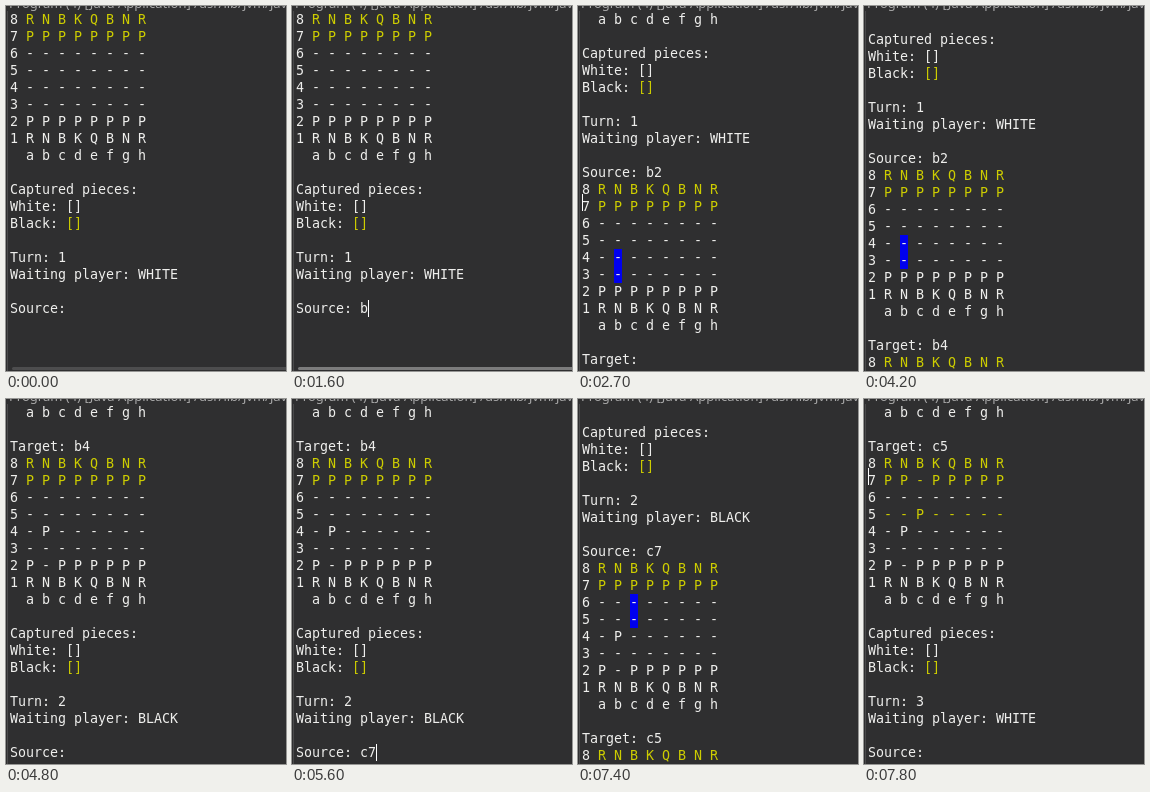
Write an HTML page with a canvas that moves like this. It is 280 px wide and 365 px high and loops after 8000 ms.

```html
<!DOCTYPE html>
<html lang="en">
<head>
<meta charset="utf-8">
<title>Console chess</title>
<style>
  html, body { margin: 0; width: 100%; height: 100%; overflow: hidden; background: #2f2f30; }
  canvas { display: block; }
</style>
</head>
<body>
<canvas id="stage" width="280" height="365"></canvas>
<script>
const ctx = document.getElementById('stage').getContext('2d');
const W = 280, H = 365, LOOP = 8000;
const LEFT = 4, CELL = 8, LINE = 17, ASCENT = 13;
const BG = '#2f2f30', TEXT = '#eeeeec', YELLOW = '#cdcd00', BLUE = '#0000ee';

// Console content: each line is { text, yellowFrom, yellowTo, mark }
const lines = [];
const say = (text = '', from = 0, to = 0) => lines.push({ text, from, to, mark: -1 });

function board(ranks, marks = []) {
  ranks.forEach((rank, i) => {
    say(8 - i + ' ' + [...rank].join(' '));
    const line = lines[lines.length - 1];
    if (i < 4 && /[A-Z]/.test(rank) && !(rank.startsWith('-P'))) {
      line.from = 2;
      line.to = 17;
    }
    const mark = marks.find(m => m[1] === 8 - i);
    if (mark) line.mark = 2 + 2 * 'abcdefgh'.indexOf(mark[0]);
  });
  say('  a b c d e f g h');
  say();
}

function status(turn, player) {
  say('Captured pieces:');
  say('White: []');
  say('Black: []', 7, 9);
  say();
  say('Turn: ' + turn);
  say('Waiting player: ' + player);
  say();
}

const BACK = 'RNBKQBNR', PAWNS = 'PPPPPPPP', NONE = '--------';
const start = [BACK, PAWNS, NONE, NONE, NONE, NONE, PAWNS, BACK];
const second = [BACK, PAWNS, NONE, NONE, '-P------', NONE, 'P-PPPPPP', BACK];
const third = [BACK, 'PP-PPPPP', NONE, '--P-----', '-P------', NONE, 'P-PPPPPP', BACK];

board(start);
status(1, 'WHITE');
say('Source: b2');
board(start, [['b', 4], ['b', 3]]);
say('Target: b4');
board(second);
status(2, 'BLACK');
say('Source: c7');
board(second, [['c', 6], ['c', 5]]);
say('Target: c5');
board(third);
status(3, 'WHITE');
say('Source: ');

// [time, last line, y of last line, typed chars on last line, caret, stray caret y]
const ALL = 99, PROMPT = 8;
const states = [
  [0, 17, 294, PROMPT, false, 0],
  [1000, 17, 294, PROMPT, true, 0],
  [1600, 17, 294, 9, true, 0],
  [1900, 17, 294, 10, true, 0],
  [2600, 18, 311, ALL, false, 0],
  [2700, 28, 345, PROMPT, false, 188],
  [3300, 28, 345, PROMPT, false, 0],
  [3400, 28, 345, 9, true, 0],
  [4000, 28, 345, 10, true, 0],
  [4200, 29, 348, ALL, false, 0],
  [4300, 46, 345, PROMPT, false, 69],
  [4800, 46, 345, PROMPT, false, 0],
  [5100, 46, 345, 9, true, 0],
  [5600, 46, 345, 10, true, 0],
  [5800, 47, 348, ALL, false, 0],
  [5900, 57, 345, PROMPT, false, 188],
  [6500, 57, 345, PROMPT, false, 0],
  [6700, 57, 345, 9, true, 0],
  [7100, 57, 345, 10, true, 0],
  [7400, 58, 348, ALL, false, 0],
  [7500, 74, 348, ALL, false, 0],
  [7800, 75, 345, PROMPT, false, 69]
];

function box(color, x, y, w, h) {
  ctx.fillStyle = color;
  ctx.fillRect(x, y, w, h);
}

function drawLine(line, y, count) {
  [...line.text].slice(0, count).forEach((ch, i) => {
    const x = LEFT + i * CELL;
    if (i === line.mark) box(BLUE, x, y, CELL, LINE);
    if (ch === ' ') return;
    ctx.fillStyle = i >= line.from && i < line.to ? YELLOW : TEXT;
    ctx.fillText(ch, x, y + ASCENT);
  });
}

function drawHeader() {
  ctx.save();
  ctx.beginPath();
  ctx.rect(0, 0, W, 5);
  ctx.clip();
  ctx.font = '13px "Noto Sans", sans-serif';
  ctx.fillStyle = '#a9a9a9';
  ctx.fillText('Program (4) [Java Application] /usr/lib/jvm/java', 3, 2);
  ctx.restore();
}

// The scroll bar fades in and out in 100 ms steps
function barLevel(t) {
  const step = Math.floor(t / 100);
  if (t < 1900) return Math.min(1, 0.4 + 0.12 * step);
  if (t < 2400) return Math.max(0.2, 1 - 0.2 * (step - 18));
  return 0;
}

function drawBar(t) {
  ctx.globalAlpha = barLevel(t);
  ctx.fillStyle = '#7c7c7c';
  ctx.beginPath();
  ctx.roundRect(6, 361, W, 3, 1.5);
  ctx.fill();
  ctx.globalAlpha = 1;
}

function draw(t) {
  const [, last, lastY, typed, caret, stray] = states.filter(s => s[0] <= t).pop();
  box(BG, 0, 0, W, H);

  ctx.save();
  ctx.beginPath();
  ctx.rect(2, 5, W, H);
  ctx.clip();
  ctx.font = '13.333px "DejaVu Sans Mono", monospace';
  for (let i = last; i >= 0; i--) {
    const y = lastY - (last - i) * LINE;
    if (y < 0) break;
    drawLine(lines[i], y, i === last ? typed : ALL);
  }
  if (caret) box('#fff', LEFT + typed * CELL, lastY, 1, LINE);
  if (stray) box('#fff', LEFT, stray, 1, LINE);
  ctx.restore();

  drawHeader();
  drawBar(t);
  box('#4a4a4b', 1, 5, 1, H);
}

const begin = performance.now();
function tick() {
  draw((performance.now() - begin) % LOOP);
  requestAnimationFrame(tick);
}
tick();
</script>
</body>
</html>
```
